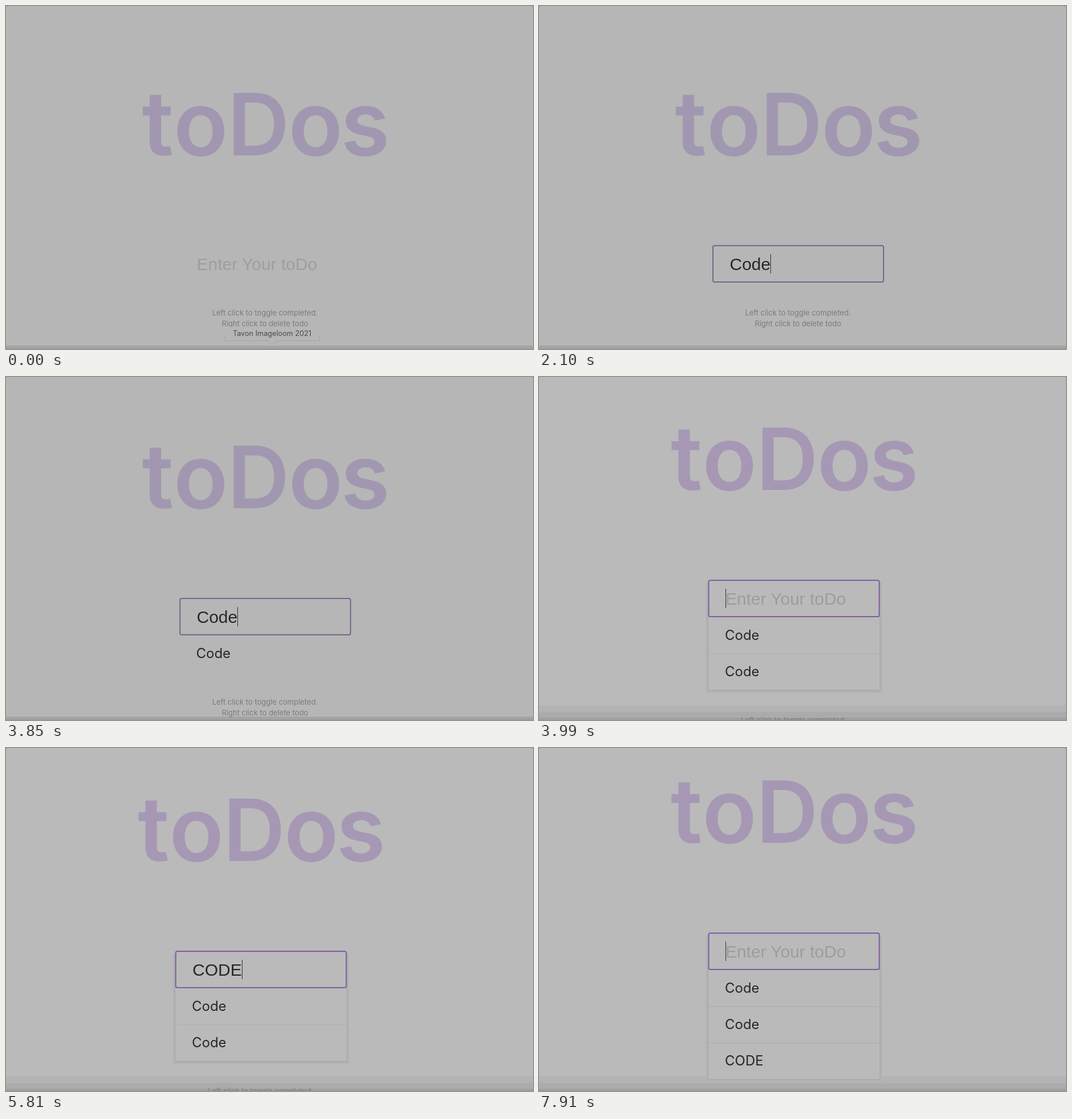
An HTML page that plays this animation: 927x604 px, repeating every 8000 ms.

```html
<!DOCTYPE html>
<html lang="en">
<head>
<meta charset="utf-8">
<title>toDos</title>
<style>
  html, body { margin: 0; width: 100%; height: 100%; overflow: hidden; background: #6c6c6c; }
  svg {
    display: block; width: 927px; height: 604px; border-radius: 2px;
    --page: #b6b6b6; --title: #a297b0; --focus: #79648f; --faint: #9e9e9e;
    background: var(--page);
  }
  svg.lit { --page: #bababa; --title: #a698b5; --focus: #7e5da2; --faint: #9d9d9d; }
  text { font-family: Inter, "Open Sans", sans-serif; white-space: pre; }
  #title { font-size: 158px; font-weight: 600; fill: var(--title); }
  #title tspan { font-size: 151px; }
  #field { font: 30px "Liberation Sans", Arial, sans-serif; }
  #field.empty { fill: var(--faint); }
  #field, .item text { fill: #272727; }
  .item text { font-size: 24px; }
  .item rect { fill: var(--page); }
  .item path { stroke: #acacac; }
  #hints text { font-size: 13px; fill: #7b7b7b; text-anchor: middle; }
  #focus { fill: var(--page); stroke: var(--focus); stroke-width: 2; }
  #caret { fill: #303030; }
  #tip text { font-size: 12.7px; fill: #4a4a4a; text-anchor: middle; }
  .litOnly { display: none; }
  .lit .litOnly { display: inline; }
  .lit .dimOnly { display: none; }
</style>
</head>
<body>
<svg id="stage" viewBox="0 0 927 604">
  <g class="dimOnly">
    <rect y="598" width="927" height="6" fill="#a4a4a4"/>
    <rect y="603" width="927" height="1" fill="#989898"/>
  </g>
  <g class="litOnly">
    <rect y="578" width="927" height="12" fill="#b3b3b3"/>
    <rect y="590" width="927" height="10" fill="#ababab"/>
    <rect y="600" width="927" height="4" fill="#a0a0a0"/>
  </g>

  <g id="page">
    <g id="hints">
      <text x="455.5" y="545">Left click to toggle completed.</text>
      <text x="455.5" y="564">Right click to delete todo</text>
    </g>
    <g id="form">
      <text id="title" y="263">to<tspan>D</tspan>os</text>
      <g class="litOnly">
        <rect id="glow" x="301" y="425" width="310" rx="4" fill="#b3b3b3"/>
        <rect id="shade" x="304" y="425" width="304" rx="3" fill="#aaaaaa"/>
      </g>
      <g id="list"></g>
      <rect id="focus" x="306" y="422" width="300" height="64" rx="3"/>
      <text id="field" x="335.5" y="464.5"></text>
    </g>
  </g>
  <rect id="caret" width="1" height="34"/>

  <g id="tip">
    <path d="M384 565H551V589H475L468 597L461 589H388Q384 589 384 585Z" fill="#b6b6b6"/>
    <path d="M384.5 580V585Q384.5 589.5 388 589.5H461L468 597L475 589.5H551.5V580" fill="none" stroke="#a3a3a3"/>
    <text x="468" y="581">Tavon Imageloom 2021</text>
  </g>
</svg>

<script>
const LOOP = 8000, ROW = 64, LEFT = 335.5;
const $ = id => document.getElementById(id);

// time, typed text, caret shown, list length, focus shown, tooltip opacity
const steps = [
  [0, '', 0, 0, 0, 1],
  [70, '', 0, 0, 0, .75],
  [140, '', 0, 0, 0, .5],
  [210, '', 0, 0, 0, .25],
  [280, '', 0, 0, 0, 0],
  [840, '', 1, 0, 1, 0],
  [1400, '', 0, 0, 1, 0],
  [1540, 'C', 1, 0, 1, 0],
  [1820, 'Co', 1, 0, 1, 0],
  [1960, 'Cod', 1, 0, 1, 0],
  [2100, 'Code', 1, 0, 1, 0],
  [2310, '', 1, 1, 1, 0],
  [2660, '', 0, 1, 1, 0],
  [3150, '', 1, 1, 1, 0],
  [3290, 'C', 1, 1, 1, 0],
  [3570, 'Co', 1, 1, 1, 0],
  [3710, 'Cod', 1, 1, 1, 0],
  [3850, 'Code', 1, 1, 1, 0],
  [3990, '', 1, 2, 1, 0],
  [4410, '', 0, 2, 1, 0],
  [4900, '', 1, 2, 1, 0],
  [5320, 'C', 1, 2, 1, 0],
  [5460, 'CO', 1, 2, 1, 0],
  [5600, 'COD', 1, 2, 1, 0],
  [5810, 'CODE', 1, 2, 1, 0],
  [6020, '', 1, 3, 1, 0],
  [6370, '', 0, 3, 1, 0],
  [6860, '', 1, 3, 1, 0],
  [7420, '', 0, 3, 1, 0],
  [7910, '', 1, 3, 1, 0]
];

function add(tag, attrs, parent) {
  const el = document.createElementNS('http://www.w3.org/2000/svg', tag);
  for (const k in attrs) el.setAttribute(k, attrs[k]);
  return parent.appendChild(el);
}

const shift = (el, x, y) => el.setAttribute('transform', `translate(${x} ${y})`);

const items = ['Code', 'Code', 'CODE'].map((label, i) => {
  const row = add('g', { class: 'item' }, $('list'));
  const top = 487 + i * ROW;
  add('rect', { x: 305.5, y: top, width: 301, height: ROW, class: 'litOnly' }, row);
  if (i) add('path', { d: `M305.5 ${top + .5}H606.5`, class: 'litOnly' }, row);
  add('text', { x: LEFT - 1, y: top + 40 }, row).textContent = label;
  return row;
});

// Set each title letter by the centre of its ink.
function spaceTitle() {
  const pen = document.createElement('canvas').getContext('2d');
  const centres = [266, 342.5, 446, 544.5, 632];
  $('title').setAttribute('x', [...'toDos'].map((ch, i) => {
    pen.font = `600 ${ch === 'D' ? 151 : 158}px Inter, "Open Sans", sans-serif`;
    const m = pen.measureText(ch);
    return centres[i] + (m.actualBoundingBoxLeft - m.actualBoundingBoxRight) / 2;
  }).join(' '));
}

function show([, typed, caret, count, focus, tip]) {
  const lit = count > 1, dx = lit ? -7.5 : 0, lift = -count * ROW / 2;
  $('stage').classList.toggle('lit', lit);
  shift($('form'), dx, lift);
  shift($('hints'), dx, -lift);

  const field = $('field');
  field.textContent = typed || 'Enter Your toDo';
  field.style.fill = typed ? '' : 'var(--faint)';
  const end = typed ? field.getComputedTextLength() : 0;
  $('caret').setAttribute('x', Math.round(LEFT + dx + end));
  $('caret').setAttribute('y', 437 + lift);
  $('caret').style.opacity = caret;

  items.forEach((row, i) => row.style.display = i < count ? '' : 'none');
  $('glow').setAttribute('height', 67 + count * ROW);
  $('shade').setAttribute('height', 64 + count * ROW);
  $('focus').style.opacity = focus;
  $('tip').style.opacity = tip;
}

let current;
function tick() {
  const t = performance.now() % LOOP;
  const step = steps.findLast(s => s[0] <= t);
  if (step !== current) show(current = step);
  requestAnimationFrame(tick);
}

spaceTitle();
tick();
</script>
</body>
</html>
```
